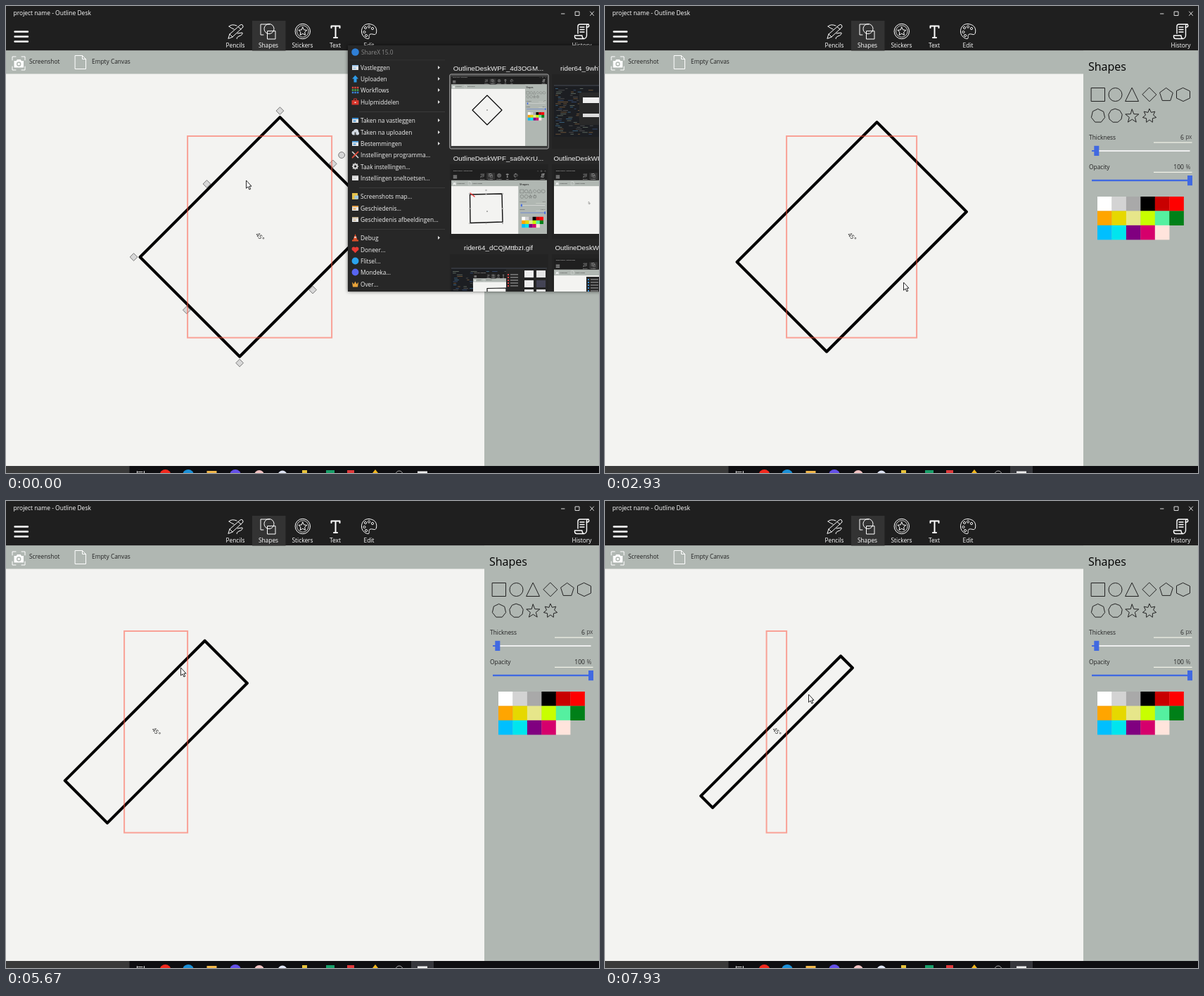
Animation, 843 px wide and 664 px high, one loop 8 s. Source, as an HTML page:

```html
<!DOCTYPE html>
<html lang="en">
<head>
<meta charset="utf-8">
<title>Rotated resize</title>
<style>
html, body { margin: 0; width: 100%; height: 100%; overflow: hidden; background: #f3f3f1; }
svg { display: block; overflow: hidden; }
#stage { width: 843px; height: 664px; }
text { font-family: "Open Sans", "Noto Sans", sans-serif; white-space: pre; }
.file { font-family: "Liberation Sans", Arial, sans-serif; }
.line { fill: none; stroke-linecap: round; stroke-linejoin: round; }
.shade { filter: drop-shadow(0 0 2.5px rgba(0, 0, 0, .6)); }
</style>
</head>
<body>
<svg id="stage" viewBox="0 0 843 664" xmlns="http://www.w3.org/2000/svg"></svg>
<script>
const GREY = '#b0b7b2', PAPER = '#f3f3f1', DARK = '#1f1f1f';

const rect = (x, y, w, h, fill, more = '') =>
  `<rect x="${x}" y="${y}" width="${w}" height="${h}" fill="${fill}" ${more}/>`;
const dot = (x, y, r, fill, more = '') => `<circle cx="${x}" cy="${y}" r="${r}" fill="${fill}" ${more}/>`;
const ring = (x, y, r, color = '#fff', width = 1) => dot(x, y, r, 'none', `stroke="${color}" stroke-width="${width}"`);
const line = (d, color = '#fff', width = 1) =>
  `<path class="line" d="${d}" stroke="${color}" stroke-width="${width}"/>`;
const text = (x, y, s, fill = '#fff', size = 8.4, more = '') =>
  `<text x="${x}" y="${y}" fill="${fill}" font-size="${size}" ${more}>${s}</text>`;
const mid = 'text-anchor="middle"';
const at = (x, y, body) => `<g transform="translate(${x} ${y})">${body}</g>`;
const clip = (x, y, w, h, body) =>
  `<svg x="${x}" y="${y}" width="${w}" height="${h}" viewBox="${x} ${y} ${w} ${h}">${body}</svg>`;
// Places a group scaled by s so that its column ox lands on x
const use = (id, x, y, s, ox = 0) =>
  `<use href="#${id}" transform="translate(${x} ${y}) scale(${s}) translate(${-ox} 0)"/>`;

// Regular polygon, or a star when an inner radius is given
function poly(cx, cy, n, r, inner) {
  const m = inner ? n * 2 : n;
  const pts = Array.from({ length: m }, (_, i) => {
    const a = i / m * Math.PI * 2 - Math.PI / 2, q = inner && i % 2 ? inner : r;
    return (cx + q * Math.cos(a)).toFixed(1) + ' ' + (cy + q * Math.sin(a)).toFixed(1);
  });
  return `M${pts.join('L')}Z`;
}

const leftTools = () =>
  text(10.5, 13, 'project name - Outline Desk', '#fff', 8.5) +
  line('M12.5 36.5H31M12.5 43.5H31M12.5 50.5H31', '#fff', 2.4) +
  line('M9 77V72H14M22 72H27V77M27 86V91H22M14 91H9V86') +
  '<path d="M11.5 78H14.5L16 76H20.5L22 78H25V87.5H11.5Z" fill="#fff"/>' + dot(18.2, 82.5, 3.2, GREY) + dot(18.2, 82.5, 1.8, '#fff') +
  line('M98.5 70.5H108.5L113.5 75.5V89.5H98.5ZM108.5 70.5V75.5H113.5') +
  text(33, 82.3, 'Screenshot', '#222') + text(122, 82.3, 'Empty Canvas', '#222');

function tabs() {
  const names = [[326, 'Pencils'], [373, 'Shapes'], [421.5, 'Stickers'], [468, 'Text'], [516, 'Edit']];
  return rect(350, 21, 47.5, 42.5, '#333') + names.map(([x, s]) => text(x, 59, s, '#fff', 8.4, mid)).join('') +
    // pencils
    line('M316 46L318 40L333 27Q337 25 337 30L322 44ZM318 40L322 44M330 29.5L334 33M317 29Q321 25 328 28M317 29Q321 32 324 33M329 39L336 38Q337 41 331 43Q327 45 328 46.5') +
    // shapes
    line('M375 26H362V41H366M371.5 36V47H383V36Z') + ring(374, 32.5, 7) +
    // stickers
    ring(421.8, 36, 10.7) + ring(421.8, 36, 8.3, '#fff', .8) + line(poly(421.8, 36.3, 5, 6.2, 3)) +
    // text
    line('M462.5 31V28.5H474.5V31M468.5 28.5V45M466 45H471', '#fff', 2) +
    // palette
    line('M516 25.5C509 25 505 31 505.5 37C506 43 512 47 515 46.5C518 46 514 41 518 40C522 39 525 43 526.5 38C528 30 523 26 516 25.5Z') +
    [[511, 31], [516, 29.5], [521, 32], [509.5, 37], [512, 42]].map(([x, y]) => ring(x, y, 1.6, '#fff', .9)).join('');
}

const rightTools = () =>
  line('M789.5 11H794', '#ddd') + line('M809.5 8H815V13.5H809.5Z', '#ddd') + line('M830.5 8L835.5 13.5M835.5 8L830.5 13.5', '#ddd') +
  line('M813 39V29Q813 26 816 26H828Q825 26 825.5 30V42Q825 46.5 821 46.5H811Q808 46 808.5 42H819Q819 46 822 46.5M828 26Q830 29 827 30H825M816 30H822M816 33.5H822M816 37H822', '#fff', 1.4) +
  text(818.5, 59, 'History', '#fff', 8.4, mid);

function panel() {
  const colors = ('fff d3d3d3 a9a9a9 000 c80000 f00 ffa500 e6d800 e6e68a c8ff00 55f0a0 008018 ' +
    '00bfff 00e5ee 800080 d6006c ffe4dc').split(' ');
  const shapes = 'M691.5 116.5H710.5V135.5H691.5Z' + 'M749.3 116.5L758.5 135.5H740Z' +
    poly(774, 126, 4, 9.8) + poly(798, 126.5, 5, 9.8) + 'M822 116.5L831.5 121V131L822 135.5L812.5 131V121Z' +
    poly(701, 156.3, 7, 9.8) + poly(725.5, 156, 9, 9.8) + poly(749.3, 157, 5, 10, 4.2) + poly(774, 156.3, 7, 10, 5.6);
  const end = 'text-anchor="end"';
  return rect(680, 63.5, 163, 591, GREY) +
    text(687, 92, 'Shapes', '#000', 16) + line(shapes, '#222') + ring(725.5, 126, 9.5, '#222') +
    text(688, 189.5, 'Thickness', '#222') + text(823, 189.5, '6', '#222', 8.6, end) + text(834.5, 189.3, 'px', '#444', 8.4, end) +
    text(688, 231.8, 'Opacity', '#222') + text(823, 231.8, '100', '#222', 8.6, end) + text(832.5, 231.8, '%', '#444', 8.4, end) +
    rect(780, 193.5, 54.5, 1.2, '#f3f3e8') + rect(780, 235.8, 54.5, 1.2, '#f3f3e8') +
    rect(692, 205, 139.5, 2, '#eee') + rect(692, 205, 7, 2, '#4169e1') + rect(695.3, 198.8, 7, 14.2, '#4169e1') +
    rect(692, 246.8, 139, 2.4, '#4169e1') + rect(828, 241, 7, 14.2, '#4169e1') +
    colors.map((c, i) => rect(700 + i % 6 * 20.45, 271 + Math.floor(i / 6) * 20.4, 20.6, 20.6, '#' + c)).join('');
}

// App window of any size; the tool groups keep to the left, centre and right
const appWindow = (x, y, w, h, s, side, body = '') => clip(x, y, w, h,
  rect(x, y, w, h, PAPER) + rect(x, y, w, 63.5 * s, DARK) + rect(x, y + 63.5 * s, w, 33 * s, GREY) +
  use('left', x, y, s) + use('tabs', x + w / 2, y, s, 421.5) + use('right', x + w, y, s, 843) +
  (side ? use('side', x + w, y, s, 843) : '') + body);

function taskbar() {
  return rect(0, 654, 843, 10, '#0e0e11') + rect(0, 654, 175.5, 10, '#3a3a3a') +
    rect(243, 654, 32, 10, '#36373c', 'id="busy"') + rect(576, 654, 32, 10, '#36373c', 'id="active"') +
    line('M186.5 661.5V664M188 662.5H194M196.5 661.5V664', '#ddd', 1.2) +
    dot(226.5, 667, 8, '#f0281e') + dot(259, 667, 8, '#1b90d8') +
    rect(285.5, 661, 14, 4, '#f2b84b') + dot(326, 667, 8, '#6450e8') +
    dot(360, 667, 7, '#f3c3c3') + dot(393, 667, 6.5, '#dfe5f5') +
    rect(421, 660, 7, 5, '#e8c33a') + rect(455, 660, 12, 5, '#18a06a') + rect(485, 660, 10, 5, '#e0393b') +
    '<path d="M521 664L525 659L529 664Z" fill="#f2b61c"/>' + ring(559, 666, 5, '#aaa') +
    rect(585, 661.5, 14, 4, '#eee');
}

// Seeded dark editor picture
function editor(x, y, w, h, seed) {
  const tint = ['#3f6f8f', '#69766a', '#80613f', '#38527c', '#555'];
  const rnd = () => (seed = seed * 16807 % 2147483647) / 2147483647;
  let out = rect(x, y, w, h, '#1c1e22') + rect(x, y, w, 2, '#33363c');
  for (let j = y + 5; j < y + h - 2; j += 2.4)
    for (let i = x + 2 + rnd() * 8; i < x + w - 12; i += 8 + rnd() * 20)
      out += rect(i.toFixed(1), j.toFixed(1), (3 + rnd() * 6).toFixed(1), .8, tint[Math.floor(rnd() * 5)]);
  return out;
}

function thumbs() {
  const label = (x, y, s, more = '') => text(x, y, s, '#f4f4f4', 9.8, 'class="file" ' + more);
  const tinyMenu = (x, y, color) => rect(x, y, 40, 32, '#262626') +
    [3, 7, 11, 15, 19].map(d => rect(x + 2, y + d, 2, 2, color) + rect(x + 6, y + d + .4, 11, 1, '#aaa')).join('');
  const knobs = [659, 682.5, 706].flatMap(x => [267, 288, 309].map(y => [x, y]))
    .map(([x, y]) => x === 682.5 && y === 288 ? '' : dot(x, y, 1.1, '#aaa')).join('');
  return label(700, 91.5, 'OutlineDeskWPF_4d3OGM...', mid) + label(788, 91.5, 'rider64_9whTq.png') +
    label(700, 219.5, 'OutlineDeskWPF_sa6lvKrU...', mid) + label(778.5, 219.5, 'OutlineDeskWPF_b2') +
    label(700, 347, 'rider64_dCQjMttbzI.gif', mid) + label(780.5, 347, 'OutlineDeskWPF_k7') +
    [97, 225, 353].map(y => rect(631, y, 140, 106, '#232323') + rect(776, y, 80, 106, '#232323')).join('') +
    rect(630.8, 97, 140.4, 106, '#3a3a3a', 'stroke="#aaa" rx="2"') +
    appWindow(633, 99.5, 136, 99.5, .19, true, line('M684 127L705 148L684 169L663 148Z', '#000', 1.1) + dot(684, 148, .7, '#333')) +
    appWindow(633, 232, 136, 92, .25, true, line('M659.5 268L705 267L706 307L660 308.5Z', '#111', 1.4) +
      line('M660 266L666 271', '#e33', 1.2) + knobs + dot(684, 292, .7, '#333') + dot(682.5, 262, 1.3, '#bbb')) +
    editor(779, 112, 70, 74, 77) + rect(815, 123, 30, 46, '#292929') + rect(820, 130, 25, 8, '#eee') + rect(820, 153, 25, 5, '#ddd') +
    appWindow(779, 232, 136, 92, .25, true, use('arrow', 828, 278, .3)) +
    editor(633, 372, 136, 34, 15) + appWindow(664, 378, 72, 50, .15, false, line('M684 420V401.5L711 401V420', '#111', 1.2)) +
    rect(711, 374, 58, 32, '#262626') + tinyMenu(711, 378, '#d44') +
    [376, 390, 403].map(y => rect(737, y, 13, 10, '#eee') + rect(754, y, 13, 10, y === 390 ? '#445' : '#e5e5e5')).join('') +
    appWindow(779, 359, 136, 92, .25, true) + tinyMenu(825, 385, '#3a8fd8');
}

function menu() {
  // y, label, icon kind and colour, submenu flag
  const rows = [
    [88, 'Vastleggen', 'w', '#9cc4e8', 1], [104, 'Uploaden', 'u', '#2f9be8', 1], [120, 'Workflows', 'g', '#d8453c', 1], [137, 'Hulpmiddelen', 'b', '#d8362c', 1],
    [163, 'Taken na vastleggen', 'w', '#3f8fd0', 1], [180, 'Taken na uploaden', 'c', '#d5dce5', 1], [196, 'Bestemmingen', 'w', '#58a3dd', 1],
    [212, 'Instellingen programma...', 'x', '#d44a3a'], [228.5, 'Taak instellingen...', 'o', '#ddd'], [245, 'Instellingen sneltoetsen...', 'w', '#ccc'],
    [271, 'Screenshots map...', 'f', '#e5c34a'], [288, 'Geschiedenis...', 'w', '#e8a24a'], [304, 'Geschiedenis afbeeldingen...', 'w', '#c9b89a'],
    [330, 'Debug', 't', '#e8542c', 1], [347, 'Doneer...', 'h', '#e83a34'], [363, 'Flitsel...', 'd', '#2aa3ef'],
    [379, 'Mondeka...', 'd', '#5865f2'], [396, 'Over...', 'k', '#e8a33a']];
  const icons = {
    w: c => rect(-4.5, -3.5, 9, 7, '#e8e8e8') + rect(-4.5, -3.5, 9, 2, c) + rect(-3, 0, 4, 2, c),
    u: c => `<path d="M0 -5L4.5 0H2V5H-2V0H-4.5Z" fill="${c}"/>`,
    g: c => [-3.5, 0, 3.5].flatMap((y, j) => [-3.5, 0, 3.5].map(x => rect(x - 1.2, y - 1.2, 2.5, 2.5, [c, '#4aa84e', '#3a82d8'][j]))).join(''),
    b: c => rect(-5, -2.5, 10, 6.5, c) + line('M-2 -3V-4.5H2V-3', c) + rect(-1, 0, 2, 1.5, '#eee'),
    c: c => dot(-2, 1, 3, c) + dot(1, -1, 3.5, c) + dot(3, 1.5, 2.5, c) + rect(-1, 0, 2, 4, '#555'),
    x: c => line('M-4 -4L4 4', '#ddd', 1.6) + line('M4 -4L-4 4', c, 1.8),
    o: c => line(poly(0, 0, 8, 4.5, 3), c) + ring(0, 0, 2.5, c, 1.5),
    f: c => rect(-4.5, -4.5, 8, 9, c) + rect(-1, -1, 5.5, 5, '#9ec5e0'),
    t: c => `<path d="M0 -5.5L3 3H-3Z" fill="${c}"/>` + rect(-4.5, 3, 9, 2, c) + rect(-1.6, -1.5, 3.2, 1.5, '#eee'),
    h: c => dot(-2.2, -1.3, 2.7, c) + dot(2.2, -1.3, 2.7, c) + `<path d="M-4.7 -.2L0 4.8L4.7 -.2Z" fill="${c}"/>`,
    d: c => dot(0, 0, 4.9, c),
    k: c => `<path d="M-4.5 -3L-2 0L0 -4L2 0L4.5 -3L3.5 4H-3.5Z" fill="${c}"/>`
  };
  return rect(486, 56, 400, 350, '#272727', 'class="shade"') + clip(486, 56, 357, 350,
    dot(496.5, 65.5, 5.3, '#2f7fd6') + text(505, 68.8, 'ShareX 15.0', '#8a8a8a', 8.3) +
    rect(488, 76.5, 136, .8, '#353535') + [150, 258, 317].map(y => rect(502, y, 122, 1, '#3a3a3a')).join('') +
    rows.map(([y, s, kind, c, sub]) => at(496.5, y - .5, icons[kind](c)) + text(504, y + 3, s, '#f2f2f2', 8.3) +
      (sub ? `<path d="M614 ${y - 3}L617 ${y - .5}L614 ${y + 2}Z" fill="#ddd"/>` : '')).join('') + thumbs());
}

const stage = document.getElementById('stage');
stage.innerHTML = `<defs>
  <g id="left">${leftTools()}</g><g id="tabs">${tabs()}</g><g id="right">${rightTools()}</g><g id="side">${panel()}</g>
  <path id="arrow" d="M.5 0V11.2L3.1 8.9L4.9 13L6.7 12.2L4.9 8.2H8Z" fill="#fff" stroke="#111" stroke-width=".9"/>
</defs>` + appWindow(0, 0, 843, 664, 1, true,
  `<g id="box"><rect id="shape" fill="none" stroke="#000" stroke-width="4.1" stroke-linejoin="round"/>
   <g id="grips"></g>${text(0, 2.5, '45°', '#222', 8.4, mid)}</g>
   <rect id="frame" y="185" height="286.6" fill="none" stroke="rgba(255,80,60,.5)" stroke-width="2"/>`) +
  taskbar() + `<g id="menu">${menu()}</g><use id="cursor" href="#arrow"/>`;

const el = Object.fromEntries(['box', 'shape', 'grips', 'frame', 'menu', 'cursor', 'busy', 'active']
  .map(id => [id, document.getElementById(id)]));
const attr = (node, map) => { for (const k in map) node.setAttribute(k, map[k]); };
const show = (node, on) => { node.style.display = on ? '' : 'none'; };

const HEIGHT = 286, ANCHOR = 258, CY = 328.3, INSET = 2.4, TICK = 1000 / 15, LOOP = 8000;
// tick, signed width, cursor x, cursor y
const keys = [
  [0, 205, 341, 248], [14, 205, 515, 433], [22, 205, 468, 356], [29, 205, 468, 356], [30, 205, 438, 402],
  [34, 205, 438, 402], [44, 185, 424, 393], [47, 172, 415, 386], [50, 171, 414, 385], [56, 149, 400, 373],
  [59, 149, 400, 373], [72, 30, 320, 309], [85, -90, 248, 237], [98, -204, 180, 171], [102, -234, 162, 153],
  [104, -234, 162, 153], [107, -199, 183, 174], [117, -55, 272, 259], [119, -28.5, 289, 275]];

// Resize grips around the starting size
const gw = 205 / 2 + 4, gh = HEIGHT / 2 + 4, gripStyle = 'stroke="#777" stroke-width=".9"';
el.grips.innerHTML = [-1, 0, 1].flatMap(i => [-1, 0, 1].map(j => i || j
  ? rect(i * gw - 3.8, j * gh - 3.8, 7.6, 7.6, '#d8d8d8', gripStyle) : '')).join('') + dot(0, -gh - 17.5, 4.4, '#d8d8d8', gripStyle);

function pose(k) {
  let i = 0;
  while (i < keys.length - 2 && keys[i + 1][0] <= k) i++;
  const a = keys[i], b = keys[i + 1], f = Math.min(1, (k - a[0]) / (b[0] - a[0]));
  return [1, 2, 3].map(n => a[n] + (b[n] - a[n]) * f);
}

function draw(ms) {
  const k = Math.floor((ms % LOOP + 4) / TICK) % 120;
  const [w, x, y] = pose(k), size = Math.abs(w);
  attr(el.box, { transform: `translate(${ANCHOR + w / 2 + .3} ${CY}) rotate(45)` });
  attr(el.shape, {
    x: INSET - size / 2, y: INSET - HEIGHT / 2,
    width: Math.max(.1, size - INSET * 2), height: HEIGHT - INSET * 2
  });
  attr(el.frame, { x: Math.min(ANCHOR, ANCHOR + w) + .1, width: size });
  attr(el.cursor, { x, y });
  show(el.grips, k < 27);
  show(el.menu, k < 14);
  show(el.busy, k >= 7 && k < 20);
  show(el.active, k >= 20);
}

const start = performance.now();
function loop() {
  draw(performance.now() - start);
  requestAnimationFrame(loop);
}
loop();
</script>
</body>
</html>
```
